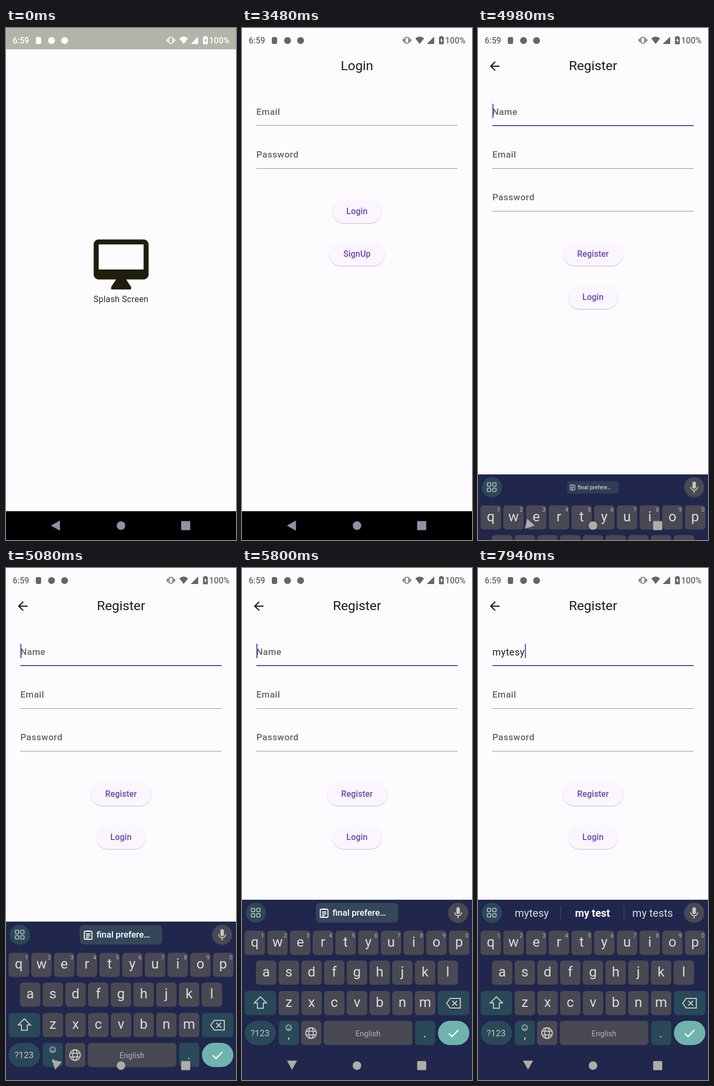
Animation of 432 by 960 pixels, one loop 8 s. Source, as an HTML page:

```html
<!DOCTYPE html>
<html lang="en">
<head>
<meta charset="utf-8">
<title>Login and register</title>
<style>
html, body { margin: 0; width: 100%; height: 100%; overflow: hidden; background: #fcfcff; }
body { position: relative; font-family: Roboto, "Open Sans", sans-serif; }
body > *, .page > * { position: absolute; }
svg { display: block; overflow: visible; }
.page { left: 0; top: 0; width: 432px; height: 907px; background: #fcfcff; overflow: hidden; }
.mid { left: 0; width: 432px; text-align: center; white-space: nowrap; }
.title { top: 56px; font-size: 24.75px; line-height: 30px; color: #1d1b12; }
.field { left: 27px; width: 378px; height: 41px; font-size: 17px; font-weight: 500;
  line-height: 30px; letter-spacing: .5px; color: #67645a; border-bottom: 1.2px solid #97958b; }
.btn { left: 50%; transform: translateX(-50%); box-sizing: border-box; height: 45px; padding: 0 27px;
  border-radius: 23px; background: #fbf5fd; box-shadow: 0 1px 1px #bdb8e6; white-space: nowrap;
  font-size: 15.75px; font-weight: 500; line-height: 45px; letter-spacing: .11px; color: #6a45b0; }

/* every animation shares the 8 s loop; 1% is 80 ms */
.page, .scrim, .bar, .nav *, #kb, #chip, #caret, #focus {
  animation-duration: 8s; animation-iteration-count: infinite; animation-timing-function: linear; }
.scrim { left: 0; top: 0; width: 432px; height: 907px; background: #000; }

#splash { animation-name: out1; }
#login { animation-name: fade1, zoom1, out2; animation-composition: replace, replace, add; }
#register { animation-name: fade2, zoom2; }
#scrim1 { animation-name: dim1; }
#scrim2 { animation-name: dim2; }
@keyframes out1 {
  0%, 9.125% { transform: none; animation-timing-function: cubic-bezier(.05,0,.133,.06); }
  9.75% { transform: scale(1.02); animation-timing-function: cubic-bezier(.208,.82,.25,1); }
  12.875%, 100% { transform: scale(1.05); }
}
@keyframes fade1 { 0%, 9.59% { opacity: 0; } 10.06%, 100% { opacity: 1; } }
@keyframes zoom1 {
  0%, 9.125% { transform: scale(.85); animation-timing-function: cubic-bezier(.05,0,.133,.06); }
  9.75% { transform: scale(.91); animation-timing-function: cubic-bezier(.208,.82,.25,1); }
  12.875%, 100% { transform: scale(1); }
}
@keyframes out2 {
  0%, 43.625% { transform: scale(1); animation-timing-function: cubic-bezier(.05,0,.133,.06); }
  44.25% { transform: scale(1.02); animation-timing-function: cubic-bezier(.208,.82,.25,1); }
  45.6%, 100% { transform: scale(1.05); }
}
@keyframes fade2 { 0%, 44.1% { opacity: 0; } 44.56%, 100% { opacity: 1; } }
@keyframes zoom2 {
  0%, 43.625% { transform: scale(.85); animation-timing-function: cubic-bezier(.05,0,.133,.06); }
  44.25% { transform: scale(.91); animation-timing-function: cubic-bezier(.208,.82,.25,1); }
  45.6%, 100% { transform: scale(1); }
}
@keyframes dim1 { 0%, 9.9% { opacity: 0; } 10.69%, 12.87% { opacity: .6; } 12.875%, 100% { opacity: 0; } }
@keyframes dim2 { 0%, 44.4% { opacity: 0; } 45.19%, 45.59% { opacity: .6; } 45.6%, 100% { opacity: 0; } }

.bar { left: 0; top: 0; width: 432px; height: 40px; animation-name: bar; animation-timing-function: step-end; }
.bar text { font: 500 15.75px Roboto, sans-serif; fill: currentColor; }
@keyframes bar {
  0% { background: #b4b3a9; color: #fff; }
  10%, 100% { background: transparent; color: #69675a; }
}

#focus { left: 27px; top: 182px; width: 378px; height: 2px; background: #6b46b5; animation-name: focus; }
@keyframes focus { 0%, 58% { opacity: 0; } 60%, 100% { opacity: 1; } }
#typed { left: 27px; top: 142px; height: 30px; font-size: 18px; line-height: 31px; letter-spacing: .56px; color: #1f1d1a; }
#caret { position: absolute; left: 100%; top: 0; width: 2.2px; height: 27px; background: #6b46b5;
  animation-name: caret; animation-timing-function: step-end; }
@keyframes caret { 0% { opacity: 0; } 58.25% { opacity: 1; } 65.5% { opacity: 0; } 72.5%, 100% { opacity: 1; } }

.strip { left: 0; top: 906px; width: 432px; height: 54px; background: #000; }
#kb { left: 0; top: 622px; animation-name: rise; }
@keyframes rise {
  0%, 61.03% { transform: translateY(338px); animation-timing-function: cubic-bezier(.4,0,.2,1); }
  65.15%, 100% { transform: none; }
}
#chip { transform-origin: 216px 646.5px; animation-name: grow; }
@keyframes grow {
  0%, 61% { transform: scale(.3); opacity: .4; }
  62.25% { transform: scale(.62); opacity: .75; }
  63.25%, 100% { transform: none; opacity: 1; }
}
.nav { left: 0; top: 907px; }
.nav * { animation-name: tint; animation-timing-function: step-end; }
.nav #back { transform-origin: 93px 25px; animation-name: tint, turn; animation-timing-function: step-end, linear; }
@keyframes tint { 0% { fill: #9290a9; } 61.9%, 100% { fill: #afada5; } }
@keyframes turn {
  0%, 61.1% { transform: none; } 62.25% { transform: rotate(-47deg); }
  63.5% { transform: rotate(-78deg); } 64.6%, 100% { transform: rotate(-90deg); }
}

#kb text { font-family: Roboto, "Open Sans", sans-serif; text-anchor: middle; fill: #dcdcdf; }
#kb .key { fill: #484953; }
#kb .alt { fill: #294858; }
#kb .down { fill: #72737d; }
#kb .ltr { font-size: 26px; }
#kb .num { font-size: 11px; fill: #b5b5ba; }
#kb .line { fill: none; stroke: #c6c6c4; stroke-width: 2; }
#kb .sug { font-size: 20px; }
</style>
</head>
<body>
<div class="page" id="splash">
  <svg style="left:159.75px;top:386.5px" width="112.5" height="112.5" viewBox="0 0 24 24"><path fill="#1f1d0b" d="M21 2H3c-1.1 0-2 .9-2 2v12c0 1.1.9 2 2 2h7l-2 3v1h8v-1l-2-3h7c1.1 0 2-.9 2-2V4c0-1.1-.9-2-2-2zm0 12H3V4h18v10z"/></svg>
  <div class="mid" style="top:499px;font-size:15.75px;line-height:20px;letter-spacing:.28px;color:#2b2930">Splash Screen</div>
</div>
<div class="scrim" id="scrim1"></div>
<div class="page" id="login">
  <div class="mid title">Login</div>
  <div class="field" style="top:142px;height:40px;border-color:#918eab">Email</div>
  <div class="field" style="top:222px">Password</div>
  <div class="btn" style="top:321px">Login</div>
  <div class="btn" style="top:401px">SignUp</div>
</div>
<div class="scrim" id="scrim2"></div>
<div class="page" id="register">
  <svg style="left:18px;top:58px" width="27" height="27" viewBox="0 0 24 24"><path fill="#251a1a" d="M20 11H7.83l5.59-5.59L12 4l-8 8 8 8 1.41-1.41L7.83 13H20v-2z"/></svg>
  <div class="mid title">Register</div>
  <div class="field" style="top:142px;height:40px"><span id="hint">Name</span></div>
  <div class="field" style="top:222px">Email</div>
  <div class="field" style="top:302px">Password</div>
  <div id="focus"></div>
  <div id="typed"><span id="value"></span><i id="caret"></i></div>
  <div class="btn" style="top:401px">Register</div>
  <div class="btn" style="top:482px">Login</div>
</div>
<div class="bar">
  <svg width="432" height="40" fill="currentColor">
    <text x="12.5" y="29">6:59</text>
    <rect x="56" y="17" width="10" height="13" rx="3"/>
    <circle cx="85.5" cy="23.5" r="6.5"/>
    <circle cx="110" cy="23.5" r="6.5"/>
    <g fill="none" stroke="currentColor" stroke-width="1.5">
      <rect x="306.5" y="17.5" width="6.5" height="11" rx="1"/>
      <path d="M304.3 19v8M302.3 21v4M315.2 19v8M317.2 21v4"/>
    </g>
    <path d="M325.5 19.5Q333.7 12.5 342 19.5L333.7 30z"/>
    <path d="M361 16v14h-14z"/>
    <path fill-rule="evenodd" d="M372.5 16.5v-1.5h4v1.5h1.5q1 0 1 1v12q0 1-1 1h-7q-1 0-1-1v-12q0-1 1-1zM375.2 18.5l-3 5.5h2v4l3-5.5h-2z"/>
    <text x="381.5" y="29">100%</text>
  </svg>
</div>
<div class="strip"></div>
<svg id="kb" width="432" height="338" viewBox="0 622 432 338"></svg>
<svg class="nav" width="432" height="53">
  <path id="back" d="M84.3 26L101.3 16.5V35.5z"/>
  <circle cx="216" cy="26" r="8"/>
  <rect x="329" y="17.5" width="17" height="17" rx="1.5"/>
</svg>
<script>
const $ = id => document.getElementById(id);
const PITCH = 42.65;

const box = (x, y, w, cls, r = 6, id = "") =>
  `<rect x="${x}" y="${y}" width="${w}" height="45.5" rx="${r}" class="${cls}" ${id && `id="key-${id}"`}/>`;
const label = (x, y, s, cls, extra = "") => `<text x="${x}" y="${y}" class="${cls}" ${extra}>${s}</text>`;
const tile = (x, y) => `<rect x="${x}" y="${y}" width="6.5" height="6.5" rx="1.5"/>`;

function row(letters, x, y, nums) {
  return [...letters].map((c, i) => {
    const cx = x + i * PITCH;
    return box(cx - 19.2, y, 38.4, "key", 6, c) + label(cx, y + 30, c, "ltr") +
      (nums ? label(cx + 14.5, y + 12.5, (i + 1) % 10, "num") : "");
  }).join("");
}

$("kb").innerHTML = `
  <rect y="622" width="432" height="338" fill="#21264c"/>
  <circle cx="26" cy="646.5" r="19" class="alt"/>
  <g class="line" style="stroke-width:1.6">${tile(17.5, 638)}${tile(27.5, 638)}${tile(17.5, 648)}${tile(27.5, 648)}</g>
  <circle cx="406" cy="646.5" r="19" class="key"/>
  <rect x="402.7" y="636" width="6.6" height="13" rx="3.3" fill="#c8c8c0"/>
  <path class="line" d="M399.5 645.5a6.5 6.5 0 0 0 13 0M406 652v5"/>
  <g id="chip">
    <rect x="138.5" y="628" width="155" height="37" rx="8" fill="#34465a"/>
    <g class="line" style="stroke:#fff;stroke-width:1.8">
      <rect x="147" y="640" width="14.5" height="15" rx="1.5"/>
      <path d="M151 639.5h6.5M150 645h8.5M150 648.5h8.5M150 652h5.5"/>
    </g>
    <text x="170" y="652" style="font-size:16.5px;font-weight:500;text-anchor:start;fill:#fff">final prefere…</text>
  </g>
  <g id="sugs">
    <path d="M155 633v27M274.5 633v27" stroke="#3b5066" stroke-width="1.2"/>
    ${label(101, 653.5, "", "sug")}
    ${label(215, 653.5, "", "sug", 'style="font-weight:700;font-size:19.6px;fill:#fff"')}
    ${label(328, 653.5, "", "sug")}
  </g>
  ${row("qwertyuiop", 24, 680, true)}
  ${row("asdfghjkl", 45.3, 736)}
  ${row("zxcvbnm", 88, 793)}
  ${box(5, 793, 59, "alt")}
  <path class="line" d="M34.5 804l11.5 11.5h-6v10h-11v-10h-6z"/>
  ${box(368, 793, 59, "alt")}
  <path class="line" d="M391 807h19v18h-19l-6.5-9zM395 811.5l9 9m0-9l-9 9"/>
  ${box(5, 849, 59, "alt", 22.7)}
  ${label(34, 878, "?123", "", 'style="font-size:16.5px;fill:#c2c8c8"')}
  ${box(69, 849, 38, "alt")}
  <g class="line" style="stroke-width:1.3">
    <circle cx="87.7" cy="862" r="5.3"/>
    <path d="M85 863.5q2.7 3 5.4 0M85.5 860.3h1.2M88.8 860.3h1.2"/>
  </g>
  ${label(88, 882, ",", "", 'style="font-size:21px"')}
  ${box(111, 849, 38, "key")}
  <g class="line" style="stroke-width:1.9">
    <circle cx="129.7" cy="872" r="10"/><ellipse cx="129.7" cy="872" rx="4.3" ry="10"/>
    <path d="M120.5 868.5h18.4M120.5 875.5h18.4"/>
  </g>
  ${box(153.5, 849, 166.5, "key")}
  ${label(236.5, 877.5, "English", "", 'style="font-size:14.5px;fill:#b2b2b5"')}
  ${box(325, 849, 38, "alt")}
  ${label(343.5, 880, ".", "", 'style="font-size:22px"')}
  <g fill="#6eb4ad">${box(368, 849, 59, "", 22.7)}</g>
  <path class="line" style="stroke:#fff;stroke-width:2.3" d="M388.5 872.5l6 6 12-12.5"/>`;

// letter, key down, text shown, key up, suggestions
const taps = [
  ["m", 6020, 6100, 6200, ["m", "my", "me"]],
  ["y", 6540, 6580, 6640, ["my", "my", "myself"]],
  ["t", 6800, 6860, 6940, ["myt", "my", "myth"]],
  ["e", 7160, 7200, 7280, ["myte", "my te", "mute"]],
  ["s", 7460, 7500, 7580, ["mytes", "my tes", "my test"]],
  ["y", 7860, 7900, 7940, ["mytesy", "my test", "my tests"]]
];
const words = $("sugs").querySelectorAll("text");
let start;

function draw(now) {
  start ??= now;
  const t = (now - start) % 8000;
  const text = taps.filter(k => t >= k[2]).map(k => k[0]).join("");
  const last = taps.filter(k => t >= k[3]).pop();
  $("value").textContent = text;
  $("hint").style.visibility = text ? "hidden" : "visible";
  $("chip").style.visibility = last ? "hidden" : "visible";
  $("sugs").style.visibility = last ? "visible" : "hidden";
  if (last) words.forEach((w, i) => w.textContent = last[4][i]);
  const held = taps.find(k => t >= k[1] && t < k[3]);
  for (const c of "mytes") $("key-" + c).classList.toggle("down", !!held && held[0] === c);
  requestAnimationFrame(draw);
}
requestAnimationFrame(draw);
</script>
</body>
</html>
```
